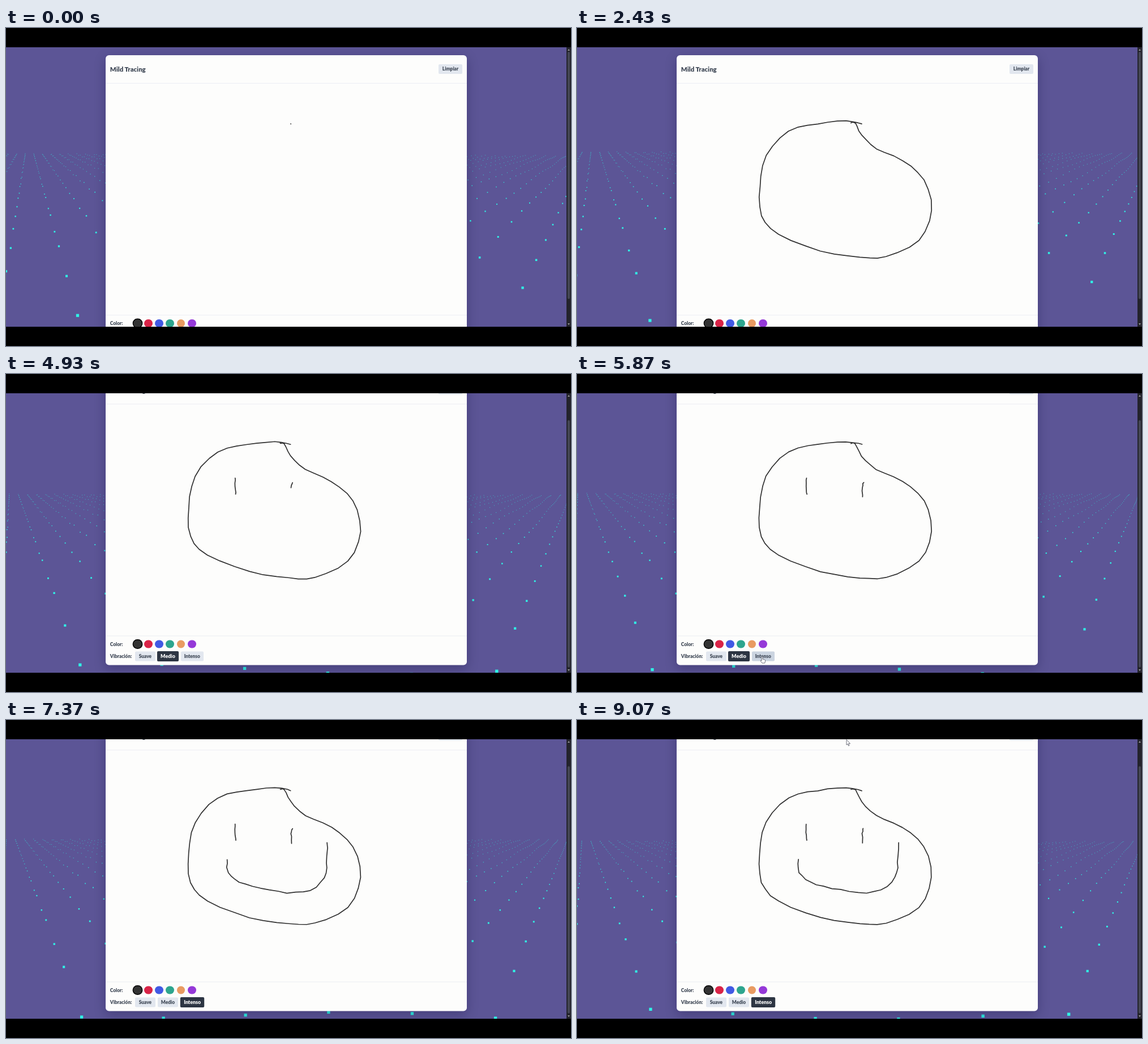
Write an HTML page with a canvas that moves like this. It is 998 by 561 pixels and loops after 9110 ms.

```html
<!DOCTYPE html>
<html lang="es">
<head>
<meta charset="utf-8">
<style>
html, body { margin: 0; width: 100%; height: 100%; overflow: hidden; background: #000; }
#stage { position: relative; width: 998px; height: 561px; overflow: hidden; background: #5c5596; font: 900 8.4px Lato, sans-serif; color: #3f4856; }
#stage canvas { position: absolute; left: 0; top: 0; }
#card { position: absolute; left: 175.8px; top: 48px; width: 638.5px; height: 509.5px; border-radius: 6px; background: #fdfdfc; box-shadow: 0 6px 20px rgba(10, 8, 50, .28); }
#card > * { position: absolute; }
.rule { left: 0; width: 100%; height: 1px; background: #eceef4; }
.label { left: 8px; line-height: 12px; white-space: nowrap; }
#title { top: 16px; font-size: 11.4px; line-height: 17px; }
.btn { display: flex; align-items: center; justify-content: center; height: 16.6px; border-radius: 2px; background: #e2e7ef; }
.btn.hover { background: #cbd4e0; }
.btn.on { background: #2d3543; color: #fff; transform: scale(1.06); }
.dot { top: 465.6px; width: 14.8px; height: 14.8px; border-radius: 50%; }
.dot.on { box-shadow: 0 0 0 1.4px #000; }
.bar { position: absolute; left: 0; width: 100%; height: 34px; background: #000; }
#scroll { position: absolute; left: 990px; top: 34px; width: 8px; height: 493px; background: #23232c; }
#thumb { position: absolute; left: 2px; top: 8px; width: 4px; height: 436px; border-radius: 2px; background: #454754; }
.arrow { position: absolute; left: 2px; border: 2px solid transparent; }
.up { top: 1px; border-bottom: 3px solid #999; }
.down { bottom: 1px; border-top: 3px solid #999; }
</style>
</head>
<body>
<div id="stage">
  <canvas id="sea" width="998" height="561"></canvas>
  <div id="card">
    <div id="title" class="label">Mild Tracing</div>
    <div class="btn" style="left:588.2px;top:16px;width:42px">Limpiar</div>
    <div class="rule" style="top:49px"></div>
    <div class="rule" style="top:458px"></div>
    <div class="label" style="top:467px">Color:</div>
    <div class="label" style="top:488px">Vibración:</div>
  </div>
  <canvas id="ink" width="998" height="561"></canvas>
  <div id="scroll"><i class="arrow up"></i><div id="thumb"></div><i class="arrow down"></i></div>
  <div class="bar" style="top:0"></div>
  <div class="bar" style="top:527px"></div>
</div>
<script>
const LOOP = 9110, SCROLL = 44.5;
const $ = id => document.getElementById(id);
const sea = $('sea').getContext('2d'), ink = $('ink').getContext('2d');
const card = $('card');

function add(cls, left, css, text = '') {
  const el = document.createElement('div');
  el.className = cls;
  el.textContent = text;
  el.style.cssText = `left:${left}px;${css}`;
  card.append(el);
  return el;
}

['#333', '#d92347', '#4159e4', '#2da58e', '#e99b62', '#9539d8'].forEach((color, i) =>
  add(i ? 'dot' : 'dot on', 49.2 + i * 19.15, `background:${color}`));

const modes = [['Suave', 227.7, 36.4], ['Medio', 268, 36], ['Intenso', 308.6, 40.4]].map(([text, x, w]) =>
  ({ x, w, el: add('btn', x - 175.8, `top:486px;width:${w}px`, text) }));

// Each stroke is a smooth curve through a few page points
const strokes = [
  { from: 0, to: 1160, shake: 1.2, keys: [[503, 169], [475, 164], [425, 169], [374, 182], [334, 225], [323, 280],
    [326, 331], [356, 364], [430, 393], [500, 404], [546, 403], [604, 375], [626, 322], [613, 268],
    [575, 234], [529, 213], [503, 189], [492, 168], [484, 167]] },
  { from: 2620, to: 2850, shake: 1, keys: [[405, 228], [404.7, 243], [406, 257]] },
  { from: 4820, to: 5050, shake: 1.6, keys: [[506, 236], [504, 245], [505, 262]] },
  { from: 6570, to: 7150, shake: 2.4, keys: [[390, 291], [393, 313], [412, 331], [450, 341], [496, 349],
    [537, 345], [562, 322], [567, 296], [568, 262]] }
];
strokes.forEach(s => s.pts = smooth(s.keys, 3));

// Catmull-Rom curve with n steps for each span
function smooth(keys, n) {
  const key = i => keys[Math.max(0, Math.min(keys.length - 1, i))];
  const out = [];
  for (let i = 0; i < keys.length - 1; i++) {
    for (let u = 0; u < 1 - 1e-6; u += 1 / n) {
      out.push([0, 1].map(d => {
        const [a, b, c, e] = [-1, 0, 1, 2].map(o => key(i + o)[d]);
        return b + u / 2 * (c - a + u * (2 * a - 5 * b + 4 * c - e + u * (3 * (b - c) + e - a)));
      }));
    }
  }
  return [...out, key(keys.length)];
}

function noise(n) {
  const v = Math.sin(n * 127.1 + 11.7) * 43758.5453;
  return v - Math.floor(v) - .5;
}

function drawSea(t) {
  const drift = (1 - Math.cos(Math.PI * t / 6800)) / 2;
  const yaw = .0465 - .0375 * drift, tilt = .19 + .032 * drift;
  const F = 491, S = .449, high = 1 + 2 * (tilt - .1894), shift = .235 - 2 * yaw;
  const c = 1 / Math.hypot(1, tilt), s = tilt * c;
  const cy = 1 / Math.hypot(1, yaw), sy = yaw * cy;
  sea.clearRect(0, 0, 998, 561);
  sea.fillStyle = '#2ff3e6';
  for (let j = 0; j < 28; j++) {
    for (let k = -34; k < 34; k++) {
      const a = shift + S * k, b = 1.31 + S * j;
      const wave = Math.cos(1.72 - 1.15 * k + 1.8 * j + 1.21 * (t / 1000 - 5.87));
      const h = high - .018 + .024 * wave;
      const side = a * cy + b * sy, ahead = b * cy - a * sy;
      const z = ahead * c + h * s;
      const x = 495 + F * side / z, y = 280.5 + F * (h * c - ahead * s) / z;
      const size = Math.max(1, 8 / z);
      sea.globalAlpha = Math.min(1, .45 + 2 / z);
      sea.fillRect(x - size / 2, y - size / 2, size, size);
    }
  }
}

function drawStroke({ pts, from, to, shake }, id, t) {
  if (t < from) return;
  const last = pts.length - 1, tick = Math.floor(t / 100);
  const at = i => pts[i].map((v, d) => v + shake * noise(tick * 331 + id * 97 + 2 * i + d));
  const done = Math.min(last, last * (t - from) / (to - from)), whole = Math.floor(done);
  ink.beginPath();
  ink.moveTo(...at(0));
  for (let i = 0; i <= whole; i++) ink.lineTo(...at(i));
  if (whole < last) {
    const p = at(whole), q = at(whole + 1), k = done - whole;
    ink.lineTo(p[0] + (q[0] - p[0]) * k, p[1] + (q[1] - p[1]) * k);
  }
  ink.stroke();
}

const hand = new Path2D('M2 1Q3-.4 4 1V5L7.6 6Q9 6.5 8.7 8L7.7 12H3L0 8Q0 6.4 2 7.4Z');
const arrow = new Path2D('M0 0V9L2 7.2L3.6 10.6L5 10L3.4 6.7H6.2Z');

// The pointer leaves the drawing area for a moment, then slips back
const visits = [
  { time: 3970, x: 304, y: 492, back: -36 },
  { time: 5870, x: 324, y: 498, back: -40 },
  { time: 9070, x: 476, y: 35, back: 18 }
];
const VISIT = 380, CLICK = 160;

function drawPointer(shape, x, y) {
  ink.save();
  ink.translate(x, y);
  ink.lineWidth = .9;
  ink.fillStyle = '#fff';
  ink.strokeStyle = '#606470';
  ink.fill(shape);
  ink.stroke(shape);
  ink.restore();
}

function drawControls(t) {
  const mode = visits.filter(v => t >= v.time + CLICK).length;
  const visit = visits.find(v => Math.abs(t - v.time) < VISIT);
  const y = visit ? visit.y + visit.back * ((t - visit.time) / VISIT) ** 4 : 0;
  let over = false;
  modes.forEach((m, i) => {
    const hit = visit && visit.x >= m.x && visit.x <= m.x + m.w && y > 489 && y < 506;
    over = over || hit;
    m.el.className = 'btn' + (i === mode ? ' on' : hit ? ' hover' : '');
  });
  if (visit) drawPointer(over ? hand : arrow, visit.x, y);
}

function draw(t) {
  const k = Math.max(0, Math.min(1, (t - 3180) / 260));
  const scroll = SCROLL * k * k * (3 - 2 * k);
  card.style.transform = `translateY(${-scroll}px)`;
  $('thumb').style.transform = `translateY(${scroll * .89}px)`;
  drawSea(t);

  ink.clearRect(0, 0, 998, 561);
  ink.lineWidth = 1.7;
  ink.lineCap = ink.lineJoin = 'round';
  ink.strokeStyle = '#303030';
  ink.save();
  ink.translate(0, -scroll);
  strokes.forEach((stroke, i) => drawStroke(stroke, i, t));
  ink.restore();
  drawControls(t);
}

const start = performance.now();
function frame() {
  draw((performance.now() - start) % LOOP);
  requestAnimationFrame(frame);
}
draw(0);
requestAnimationFrame(frame);
</script>
</body>
</html>
```
